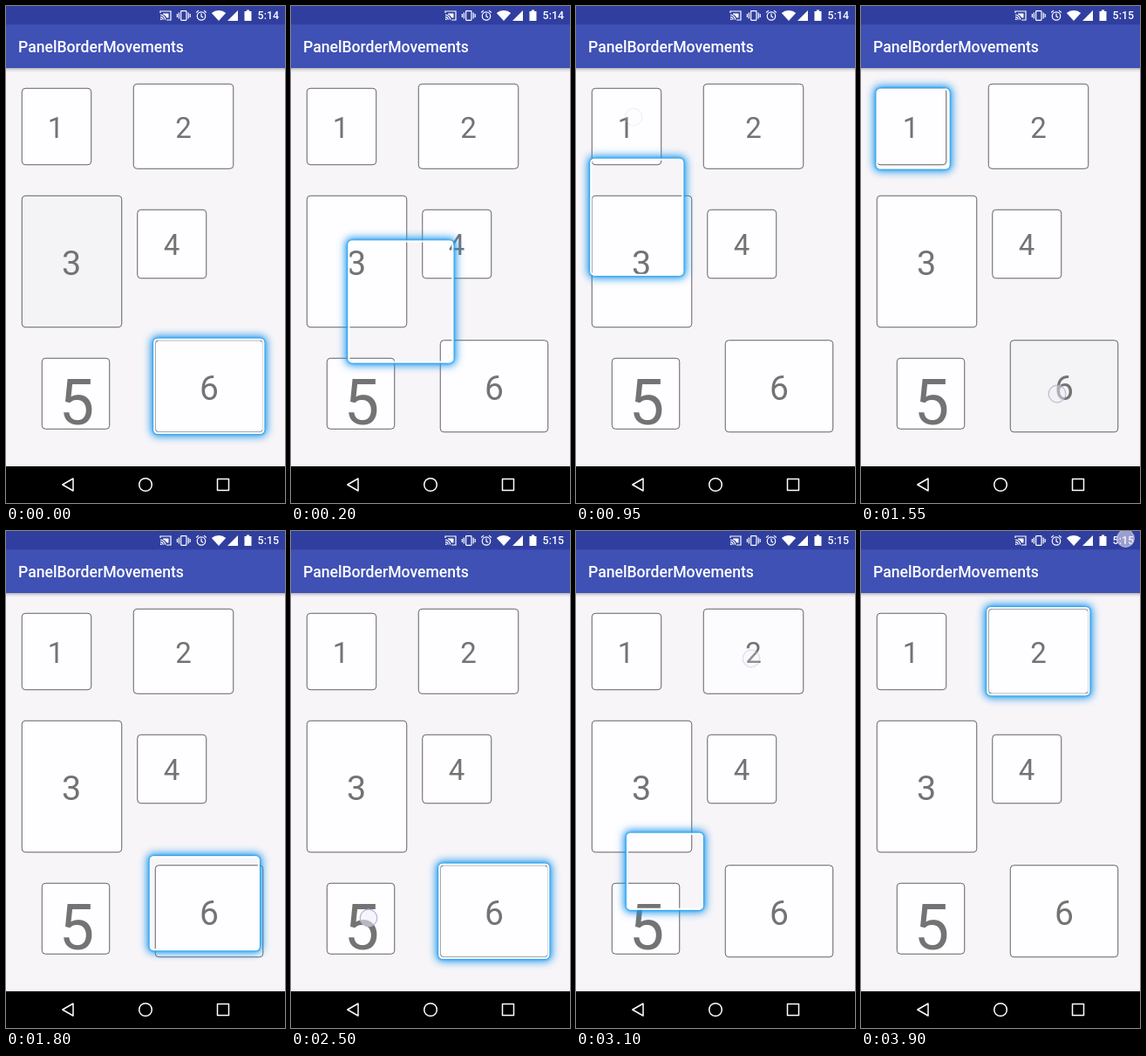
An HTML page for the animation above (3950 ms loop, 320x569 px).

```html
<!DOCTYPE html>
<html lang="en">
<head>
<meta charset="utf-8">
<title>Panel focus</title>
<style>
  html, body { margin: 0; width: 100%; height: 100%; overflow: hidden; background: #f7f5f8; }
  svg { position: absolute; left: 0; top: 0; display: block; }
  text { font-family: Roboto, "Noto Sans", sans-serif; }
  .digit { fill: #737373; text-anchor: middle; }
  .panel { stroke: #626164; stroke-width: 1; }
  .bar { font-weight: 500; fill: #fff; }
  #glow {
    position: absolute; left: 0; top: 0; box-sizing: border-box;
    border: 2px solid #fdfeff; border-radius: 4.5px;
    box-shadow: 0 0 2px 1px #1a9ff4, 0 0 10px 3px #1c96ea;
  }
</style>
</head>
<body>
<svg id="panels" width="320" height="569"></svg>
<div id="glow"></div>
<svg width="320" height="569">
  <defs>
    <linearGradient id="shade" x2="0" y2="1">
      <stop offset="0" stop-color="#000" stop-opacity=".28"/>
      <stop offset=".4" stop-color="#000" stop-opacity=".1"/>
      <stop offset="1" stop-color="#000" stop-opacity="0"/>
    </linearGradient>
  </defs>
  <rect y="71" width="320" height="5" fill="url(#shade)"/>
  <rect width="320" height="71" fill="#3f51b5"/>
  <rect width="320" height="21.3" fill="#303f9f"/>
  <text class="bar" x="14" y="53" font-size="17.6">PanelBorderMovements</text>

  <g fill="none" stroke="#fff" stroke-width="1.2">
    <path d="M177 8V6h12v10h-5M177 10.2a5.6 5.6 0 0 1 5.6 5.6M177 12.6a3.2 3.2 0 0 1 3.2 3.2"/>
    <rect x="200.6" y="5.6" width="6.4" height="10.8" rx=".8"/>
    <path d="M198.4 7.5v7M196.4 9v4M209.2 7.5v7M211.2 9v4"/>
    <circle cx="224" cy="11.5" r="4.7"/>
    <path d="M224 8.6v3.2l2.2 1.4M218.2 7.5l2.8-2.4M229.8 7.5l-2.8-2.4"/>
  </g>
  <g fill="#fff">
    <path d="M180 8.6h6.5v5h-2.2a7 7 0 0 0-4.3-4.2zM177 14.2a1.8 1.8 0 0 1 1.8 1.8H177z"/>
    <path d="M235.8 8a12.6 12.6 0 0 1 16.4 0L244 17z"/>
    <path d="M266 5v12h-12z"/>
    <path d="M273.5 6h2.4V4.6h3.2V6h2.4v11h-8z"/>
  </g>
  <text id="clock" class="bar" x="288.6" y="15.3" font-size="12.4"></text>

  <rect y="527" width="320" height="42" fill="#000"/>
  <g fill="none" stroke="#fff" stroke-width="1.5" stroke-linejoin="round">
    <path d="M64.8 548 77 541v14z"/>
    <circle cx="160" cy="548" r="7.3"/>
    <rect x="242.5" y="541.5" width="13" height="13"/>
  </g>
  <circle id="touch" r="9.8" fill="#f0eef8" fill-opacity=".55" stroke="#b3b3d6" stroke-width="1.2"/>
</svg>
<script>
const LOOP = 3950, STEP = 50, GLIDE = 300, PRESS_LEAD = 83;

// left, top, right, bottom, digit centre, baseline, font size
const panels = [
  [18, 94, 98, 182, 57, 150.5, 33],
  [146, 89, 261, 186.5, 203.5, 150.5, 33],
  [18, 217, 133, 368, 75, 308, 39.5],
  [150.5, 233, 230, 312, 190, 285, 33],
  [41, 403, 119, 484.5, 81, 479, 72],
  [171, 382.5, 295, 488, 233, 450.5, 39]
];
const moves = [
  { at: 15, from: 6, to: 3 },
  { at: 833, from: 3, to: 1, touch: [66, 127] },
  { at: 1533, from: 1, to: 6, touch: [225, 444] },
  { at: 2583, from: 6, to: 5, touch: [89, 443] },
  { at: 3017, from: 5, to: 2, touch: [201, 146] }
];
const lastTouch = { at: 3983, touch: [303.5, 8.5] };

const byId = id => document.getElementById(id);
const clamp = v => Math.min(1, Math.max(0, v));
const ease = v => 0.5 - Math.cos(Math.PI * clamp(v)) / 2;

byId('panels').innerHTML = panels.map(([l, t, r, b, x, y, size], i) =>
  `<rect class="panel" x="${l + .25}" y="${t + .25}" width="${r - l - .5}" height="${b - t - .5}" rx="4"/>
   <text class="digit" x="${x}" y="${y}" font-size="${size}">${i + 1}</text>`).join('');
const faces = document.querySelectorAll('.panel');
const glow = byId('glow'), touch = byId('touch'), clock = byId('clock');

function placeGlow(t) {
  const move = moves.filter(m => t >= m.at).pop() || { ...moves[0], at: LOOP };
  const p = ease((t - move.at) / GLIDE);
  const goal = panels[move.to - 1];
  const [l, top, r, b] = panels[move.from - 1].map((v, i) => v + (goal[i] - v) * p);
  const pad = 1.7;
  glow.style.transform = `translate(${l - pad}px, ${top - pad}px)`;
  glow.style.width = r - l + 2 * pad + 'px';
  glow.style.height = b - top + 2 * pad + 'px';
}

function shadePanels(t) {
  faces.forEach((face, i) => {
    const press = Math.max(0, ...moves.filter(m => m.to === i + 1).map(m => {
      const d = t - m.at;
      return clamp((d + PRESS_LEAD) / 60) * clamp((100 - d) / 80);
    }));
    const tone = 254 - Math.round(press * 10);
    face.setAttribute('fill', `rgb(${tone},${tone - 1},${tone + 1})`);
  });
}

function placeTouch(t) {
  const tap = [...moves, lastTouch].find(m => m.touch && t >= m.at - PRESS_LEAD && t < m.at + 150);
  touch.setAttribute('opacity', tap ? clamp(1 - (t - tap.at) / 140) : 0);
  if (tap) touch.setAttribute('transform', `translate(${tap.touch})`);
}

const start = performance.now();
function draw() {
  const t = Math.floor((performance.now() - start) % LOOP / STEP) * STEP;
  placeGlow(t);
  shadePanels(t);
  placeTouch(t);
  clock.textContent = t < 1450 ? '5:14' : '5:15';
  requestAnimationFrame(draw);
}
draw();
</script>
</body>
</html>
```
